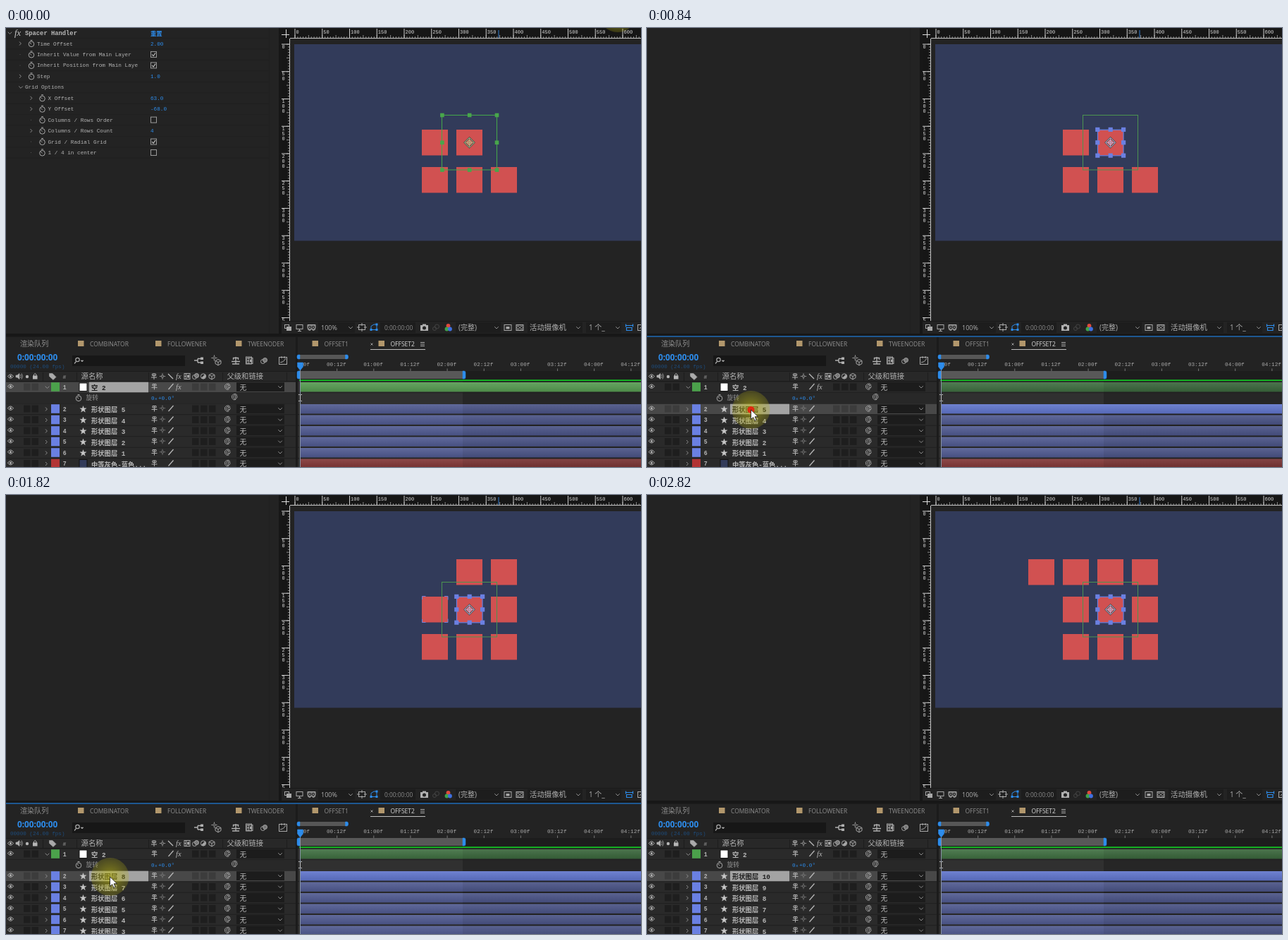
Recreate the animation shown at these times as an HTML page. Size 901 by 622 pixels, loop 2890 ms.

```html
<!DOCTYPE html>
<html lang="zh">
<head>
<meta charset="utf-8">
<style>
html, body { margin: 0; width: 100%; height: 100%; overflow: hidden; background: #232323; }
svg { display: block; width: 901px; height: 622px; }
text { white-space: pre; }
.mono { font-family: 'Liberation Mono', 'Noto Sans CJK SC', 'Noto Sans CJK', monospace; }
.ui { font-family: 'Open Sans', 'Noto Sans CJK SC', 'Noto Sans CJK', sans-serif; }
.serif { font-family: 'Liberation Serif', serif; font-style: italic; }
.b { font-weight: bold; }
</style>
</head>
<body>
<svg viewBox="0 0 901 622" xmlns="http://www.w3.org/2000/svg">
  <defs>
    <radialGradient id="halo">
      <stop offset="0" stop-color="#c2bd14" stop-opacity=".62"/>
      <stop offset="1" stop-color="#b4ae14" stop-opacity=".24"/>
    </radialGradient>
    <linearGradient id="shade" x2="0" y2="1">
      <stop offset="0" stop-color="#fff" stop-opacity=".1"/>
      <stop offset="1" stop-color="#000" stop-opacity=".1"/>
    </linearGradient>
  </defs>
  <g id="base"></g>
  <g id="scene"></g>
  <g id="pointer">
    <circle r="27" fill="url(#halo)"/>
    <circle id="click" stroke-width="2.4" stroke-opacity=".8"/>
    <path d="M0 0V13.5L3.2 10.6L5.4 15.4L7.7 14.4L5.6 9.8H10Z" fill="#fff" stroke="#111" stroke-width=".8"/>
  </g>
</svg>
<script>
const LOOP = 2890, BLUE = '#2d8ceb', GREY = '#a8a8a8', DARK = '#1d1d1d';
const $ = id => document.getElementById(id);
const range = (n, f) => Array.from({ length: n }, (_, i) => f(i)).join('');

const rect = (x, y, w, h, fill, more = '') =>
  `<rect x="${x}" y="${y}" width="${w}" height="${h}" fill="${fill}" ${more}/>`;
const frame = (x, y, w, h, color, width = 1) =>
  rect(x, y, w, h, 'none', `stroke="${color}" stroke-width="${width}"`);
const line = (d, color = GREY, width = 1, fill = 'none') =>
  `<path d="${d}" fill="${fill}" stroke="${color}" stroke-width="${width}"/>`;
const dot = (x, y, r, fill, more = '') => `<circle cx="${x}" cy="${y}" r="${r}" fill="${fill}" ${more}/>`;
const ring = (x, y, r, color = GREY, width = 1) => dot(x, y, r, 'none', `stroke="${color}" stroke-width="${width}"`);
const text = (x, y, s, size, fill = GREY, cls = 'mono') =>
  `<text x="${x}" y="${y}" font-size="${size}" fill="${fill}" class="${cls}">${s}</text>`;

const right = (x, y) => line(`M${x - 1} ${y - 2.5}l2.4 2.5l-2.4 2.5`, '#8c8c8c');
const down = (x, y) => line(`M${x - 2.8} ${y - 1.3}l2.8 2.8l2.8 -2.8`, '#8c8c8c');
const watch = (x, y) => ring(x, y + .8, 3.8) + line(`M${x - 1.5} ${y - 4.5}h3M${x - 2} ${y - 1}L${x} ${y + 1}`);
const check = (x, y, on) => frame(x - 4, y - 4, 8, 8, '#9a9a9a') +
  (on ? line(`M${x - 2.4} ${y}l2 2.2l3 -4.4`, '#bbb', 1.2) : '');
const spiral = (x, y) => line(`M${x + .5} ${y + 1.5}a1.6 1.6 0 1 1 1 -1.8a2.8 2.8 0 1 1 -2 -2.3M${x + 1.7} ${y - 2}a4.2 4.2 0 1 0 -2 6`, GREY, .9);
const eye = y => line(`M2.5 ${y}q4 -5.5 8 0q-4 5.5 -8 0z`, '#b5b5b5') + dot(6.5, y, 1.5, '#b5b5b5');
const sun = (x, y, c = '#7d7d7d') => ring(x, y, 1.6, c) +
  line(`M${x} ${y - 4}v1.5M${x} ${y + 2.5}v1.5M${x - 4} ${y}h1.5M${x + 2.5} ${y}h1.5`, c);
const shy = (x, y) => line(`M${x - 4} ${y + 1.5}h8M${x} ${y - 4}v8.5M${x - 2.5} ${y - 1}v-2.5h5v2.5z`, '#b0b0b0');
const slash = (x, y) => line(`M${x - 3.5} ${y + 4}l7 -8`, '#bbb', 1.2);
const cube = (x, y) => line(`M${x} ${y - 4}l4 2v4l-4 2.5l-4 -2.5v-4zM${x - 4} ${y - 2}l4 2l4 -2M${x} ${y}v4.5`);
const film = (x, y) => frame(x - 4, y - 4, 8, 8, GREY) + line(`M${x - 1.5} ${y - 4}v8M${x - 4} ${y}h2.5`) + rect(x, y - 2, 3, 4, GREY);
const discs = (x, y) => ring(x - 1.5, y + 1, 3) + dot(x + 1.5, y - 1, 3, '#777', `stroke="${GREY}"`);

function rulers() {
  const step = 38.75, minor = step / 10;
  return rect(391, 0, 510, 15, '#161616') + rect(391, 0, 12, 415, '#161616') +
    line('M403 14.5H901M402.5 15V415', '#c4c4c4') +
    line('M391 9.5h11M397.5 2v12', '#ddd') +
    range(127, i => line(`M${410 + i * minor} ${i % 5 ? 12 : 10}V14`, '#aaa', .8)) +
    range(101, i => line(`M${i % 5 ? 400 : 398} ${23 + i * minor}H402`, '#aaa', .8)) +
    range(13, i => line(`M${410 + i * step} 1V14`, '#ccc') + text(411.5 + i * step, 7.6, i * 50, 7, '#d8d8d8')) +
    range(11, i => line(`M391 ${23 + i * step}H402`, '#ccc') + [...String(i * 50)].map((c, j) =>
      text(391.5, 28.5 + i * step + j * 7, c, 7, '#d8d8d8')).join('')) +
    line('M699 3V14', '#2f6fb8', 1.2);
}

function viewerBar() {
  const y = 424.5;
  return rect(391, 415, 510, 18, '#232323') +
    [[443, 52], [638, 64], [740, 78], [823, 50], [531, 50]].map(([x, w]) => rect(x, 417, w, 15, DARK)).join('') +
    frame(395.5, 420.5, 6, 5, GREY) + rect(398, 423, 7, 6, GREY) +
    frame(412, 420.5, 9, 6, GREY) + line('M414 429.5h5M416.5 427v2', GREY, 1.2) +
    line('M428 420.5h11v4q0 4 -3.5 4l-2 -2.5l-2 2.5q-3.5 0 -3.5 -4z', GREY, 1, '#777') + ring(431, 424, 1.7, '#222') + ring(436, 424, 1.7, '#222') +
    text(447, 428, '100%', 9, '#b0b0b0', 'ui') + down(489, y) +
    frame(500.5, 420.5, 9, 7, GREY) + line('M505 418v4M505 426v4M498 424h4M508 424h4') +
    line('M518 427.5v-5l4 -2.5h4v7.5z', BLUE) + rect(516.5, 426, 3, 3, BLUE) + rect(524.5, 426, 3, 3, BLUE) + rect(524.5, 418.5, 3, 3, BLUE) +
    text(537, 427.6, '0:00:00:00', 8.4, '#8c8c8c', 'ui') +
    rect(588, 421, 11, 8, '#b0b0b0') + rect(591, 419.5, 5, 2, '#b0b0b0') + dot(593.5, 425, 2.5, '#232323') +
    ring(608, 426, 2.5, '#444') + ring(611.5, 423, 3, '#444') +
    dot(627.5, 422, 2.9, '#e04a3c') + dot(625.5, 426.5, 2.9, '#3fa34a') + dot(630, 426.5, 2.9, '#3f6fe0') +
    text(642, 428, '(完整)', 10, '#b0b0b0', 'ui') + down(696, y) +
    frame(707, 420.5, 10, 8, GREY) + rect(709.5, 423, 5, 3.5, GREY) +
    frame(724, 420.5, 10, 8, GREY) + line('M724 420.5l10 8M734 420.5l-10 8M729 420.5l5 4l-5 4l-5 -4z', GREY, .8) +
    text(743, 428.3, '活动摄像机', 10.4, '#b0b0b0', 'ui') + down(812, y) +
    text(827, 428.3, '1 个_', 10, '#b0b0b0', 'ui') + down(868, y) +
    line('M879.5 421.5h10M880.5 424.5h7.5v4h-7.5zM879.5 419.5v4M889.5 419.5v4', BLUE, 1.2) +
    frame(896.5, 420.5, 8, 8, GREY) + line('M899 426l3 -3');
}

function tabs() {
  const tab = (x, s, on) => rect(x, 443, 8.5, 8, '#b2976c') + text(x + 17, 450.7, s, 8.5, on ? '#d8d8d8' : '#8f8f8f', 'ui');
  return text(20, 451, '渲染队列', 10.1, '#8f8f8f', 'ui') +
    tab(102, 'COMBINATOR') + tab(212, 'FOLLOWENER') + tab(326, 'TWEENODER') +
    tab(434.5, 'OFFSET1') + tab(528.5, 'OFFSET2', true) +
    line('M517.5 446.5l3 3m0 -3l-3 3', '#999') +
    line('M588 445.5h6M588 448h6M588 450.5h6', '#aaa') + line('M517 455.5H595', '#bdbdbd');
}

function timelineTop() {
  const y = 493.5;
  return text(16, 471, '0:00:00:00', 11.8, BLUE, 'ui b') + text(6, 481.6, '00000 (24.00 fps)', 7.6, '#1d4c7c') +
    rect(94, 464, 160, 15, '#171717') + ring(101.5, 470, 2.7, '#aaa', 1.2) + line('M99.5 472.5l-2.5 3', '#aaa', 1.2) + line('M106 471h4l-2 2z', '#aaa', .5, '#aaa') +
    line('M267 471h5M272 468.5h7M272 474h7M272 468.5v5.5', '#b0b0b0', 1.4) + rect(276, 466.5, 4, 3.5, '#b0b0b0') + rect(276, 472.5, 4, 3.5, '#b0b0b0') +
    cube(301, 473.5) + sun(295.5, 467.5, GREY) +
    line('M320 472.5h12M326 466v10M322.5 470v-2.5h7v2.5M321 476h10', '#b0b0b0', 1.3) +
    film(346, 471.5) + frame(340.5, 466, 8, 10, GREY) + discs(366, 471.5) +
    frame(387.5, 466.5, 11, 10, GREY) + line('M389 474q5 0 8 -6M391 465v3M395 465v3') +
    rect(0, 487, 411, 13, '#282828') + line('M0 486.5H411M0 500.5H411', '#1b1b1b') +
    line('M52.5 488v12M100.5 488v12M202.5 488v12M307.5 488v12M398.5 488v12', DARK) +
    eye(y) + line('M14 492h2l3 -2.5v8l-3 -2.5h-2z', '#b0b0b0', .6, '#b0b0b0') + line('M20.5 491q2 2.5 0 5M22 489.5q3 4 0 8', '#b0b0b0', .8) +
    dot(30, 494, 2.2, '#b5b5b5') + rect(38, 492.5, 6.5, 5, '#b5b5b5') + line('M39.5 493v-2q1.8 -3 3.5 0v2', '#b5b5b5') +
    line('M61.5 489.5h4.5l5 5l-4 4l-5.5 -5z', '#aaa', .6, '#aaa') + text(80.5, 496.5, '#', 8) +
    text(106.5, 497, '源名称', 10.4, '#b0b0b0', 'ui') +
    shy(210, y) + sun(222, y, GREY) + line('M230 490l7 7', '#bbb', 1.2) + text(241, 497, 'fx', 10.5, '#bbb', 'serif') +
    film(257, y) + discs(269, y) + ring(280, y, 3.6) + line('M277.5 496l5 -5a3.6 3.6 0 0 1 -5 5z', GREY, 1, GREY) + cube(292, y) +
    text(313.5, 497, '父级和链接', 10.3, '#b0b0b0', 'ui');
}

function timeRuler() {
  const handle = (x, y, h, side) => line(`M${x} ${y}h${side * 2}q${side * 2} 0 ${side * 2} 2v${h - 4}q0 2 ${-side * 2} 2h${-side * 2}z`, BLUE, .5, BLUE);
  const label = k => `0${k >> 1}:${k % 2 ? '12' : '00'}f`;
  return rect(411, 438, 3, 184, '#1b1b1b') +
    rect(416, 463, 66, 6, '#575757') + handle(417, 463, 6, -1) + handle(481.5, 463, 6, 1) +
    text(417, 479, '00f', 7.7) +
    range(9, k => text(455 + k * 52.15, 479, label(k + 1), 7.7)) +
    range(10, k => line(`M${417.5 + k * 52.15} 482.5V486`, '#777')) +
    rect(414, 486, 487, 12, DARK) + rect(417, 486, 231, 11, '#585858') +
    handle(417, 486, 11, -1) + handle(648, 486, 11, 1) +
    rect(414, 501, 234, 121, '#303030') + rect(648, 501, 253, 121, '#262626') +
    rect(416, 498.3, 485, 1.8, '#12c322');
}

function base() {
  return rect(0, 0, 901, 622, '#232323') + rect(387, 0, 4, 434, '#171717') + line('M373.5 0V433', '#202020') +
    rect(409, 23, 492, 278.5, '#323b5a') + rulers() + viewerBar() + line('M391 415.5H901', '#191919') +
    rect(0, 433, 901, 4.5, '#171717') + tabs() + timelineTop() + timeRuler();
}

function effectPanel() {
  // [depth, kind, label, value]; kind: k keyed, c checkbox, g group
  const rows = [
    [0, 'k', 'Time Offset', '2.00'], [0, 'c', 'Inherit Value from Main Layer', 1],
    [0, 'c', 'Inherit Position from Main Laye', 1], [0, 'k', 'Step', '1.0'], [0, 'g', 'Grid Options'],
    [1, 'k', 'X Offset', '63.0'], [1, 'k', 'Y Offset', '-68.0'], [1, 'c', 'Columns / Rows Order', 0],
    [1, 'k', 'Columns / Rows Count', '4'], [1, 'c', 'Grid / Radial Grid', 1], [1, 'c', '1 / 4 in center', 0]];
  return range(12, i => line(`M0 ${14.5 + i * 15.45}H373`, '#1f1f1f', .7)) +
    down(5.5, 7) + text(12, 10.5, 'fx', 12.5, '#ccc', 'serif') + text(27, 10, 'Spacer Handler', 8.8, '#b8b8b8', 'mono b') +
    text(205, 10.6, '重置', 8.4, BLUE, 'mono b') +
    rows.map(([depth, kind, label, value], i) => {
      const y = 22 + i * 15.45, x = 20 + depth * 15.5;
      if (kind === 'g') return down(21, y) + text(27, y + 2.5, label, 7.7, '#b2b2b2');
      return (kind === 'k' ? right(x, y) + text(205, y + 2.7, value, 7.7, BLUE)
        : dot(x, y, .5, '#666') + check(209.5, y, value)) +
        watch(x + 16, y) + text(x + 24, y + 2.5, label, 7.7, '#b2b2b2');
    }).join('');
}

function layerRow(row, name, look, selected) {
  const isNull = look === 'null', solid = look === 'solid', shape = look === 'shape';
  const y = 509 + (isNull ? 0 : row * 15.5), top = y - 7.3;
  const tint = isNull ? '#4ba14b' : solid ? '#b23434' : '#6a80e2';
  const bar = isNull ? (selected ? '#559a50' : '#3e6e40') : solid ? '#803535' : selected ? '#5f74cb' : '#4f5990';
  const star = `M109.5 ${y - 4.5}l1.2 3.2h3.4l-2.7 2.1l1 3.4l-2.9 -2l-2.9 2l1 -3.4l-2.7 -2.1h3.4z`;
  const slot = x => rect(x, y - 5.5, 9.5, 10, selected ? '#3c3c3c' : '#1e1e1e');
  return rect(0, top, 411, 14.8, selected ? '#484848' : '#2a2a2a') + line(`M0 ${top + 15}H411`, DARK, .8) +
    eye(y - 1.3) + [25, 36.5, 264, 276, 288].map(slot).join('') +
    (isNull ? down(58.5, y) : right(57, y)) + rect(64, y - 6.8, 12, 12.6, tint) +
    text(80.8, y + 2.9, row, 8.2, '#b4b4b4', 'mono b') +
    (shape ? line(star, '#c8c8c8', .3, '#c8c8c8')
      : rect(104, y - 6, 11, 11.5, isNull ? '#fff' : '#323b5a', 'stroke="#111"')) +
    (selected ? rect(118, top, 84, 14.6, '#a3a3a3') : '') +
    text(121, y + 4, name, 9.3, selected ? '#1c1c1c' : '#b8b8b8', 'mono b') +
    shy(210.5, y - 1) + (shape ? sun(222, y - 1.3) : '') + slash(234, y - 1) +
    (isNull ? text(241, y + 2.5, 'fx', 10.5, '#bbb', 'serif') : '') +
    spiral(316.5, y - 1) + rect(327, y - 6.8, 68, 12.8, '#1c1c1c') + text(331.5, y + 3.5, '无', 9.8, '#b8b8b8', 'ui') + down(389, y - .5) +
    line(`M414 ${top + 15}H901`, DARK, .8) + rect(417, top + .3, 484, 13.4, bar) + rect(417, top + .3, 484, 13.4, 'url(#shade)') +
    (selected ? '' : rect(648, top + .3, 253, 13.4, '#000', 'opacity=".07"'));
}

function layers(count, nullOn) {
  const y = 524;
  return layerRow(1, '空 2', 'null', nullOn) +
    rect(0, 517, 411, 15, '#282828') + watch(103, y) + text(113.5, y + 3.2, '旋转', 8.8, '#8f8f8f') +
    text(206, y + 3, '0', 7.7, BLUE) + text(211, y + 3, 'x', 6, BLUE) + text(216, y + 3, '+0.0°', 7.7, BLUE) + spiral(326.5, y - 1.5) +
    range(6, i => {
      const id = count - i;
      return layerRow(i + 2, id > 0 ? '形状图层 ' + id : '中等灰色-蓝色...', id > 0 ? 'shape' : 'solid', !nullOn && i === 0);
    }) +
    line('M417.5 484V622', '#8793a6') + line('M413.5 474h8v6l-4 5l-4 -5z', BLUE, .5, BLUE) +
    line('M415 519.5h1.5l1 1l1 -1h1.5M417.5 520v8M415 528.5h1.5l1 -1l1 1h1.5', '#c0c0c0');
}

// Spiral placement of the copies around the first square
const CELLS = [[0, 0], [-1, 0], [-1, 1], [0, 1], [1, 1], [1, 0], [1, -1], [0, -1], [-1, -1], [-2, -1]];

const handles = (x, y, half, size, color) => [-1, 0, 1].map(i => [-1, 0, 1].map(j =>
  i || j ? rect(x + i * half - size / 2, y + j * half - size / 2, size, size, color) : '').join('')).join('');

function stage(count, nullOn, flash) {
  const x = 657.5, y = 162.3, mark = nullOn ? '#a9c98f' : '#b9bde6';
  return CELLS.slice(0, count).map(([i, j]) => rect(639 + i * 49, 144 + j * 53, 37, 36.5, '#d15151')).join('') +
    (flash ? line('M590.5 148v-4.5h5M622 143.5h5v5M590.5 176v4.5h5M622 180.5h5v-5', '#7080d8') : '') +
    frame(618.5, 123.5, 78, 77.5, nullOn ? '#44a84a' : '#4c9450') +
    (nullOn ? handles(x + .2, 162.3, 38.8, 5.6, '#48a64b')
      : frame(x - 18, y - 18, 36.5, 36.5, '#6b80e2', 1.2) + handles(x + .2, y, 18.4, 6.2, '#6b80e2')) +
    line(`M${x} ${y - 7}l7 7l-7 7l-7 -7z`, '#444', 2) + line(`M${x} ${y - 7}l7 7l-7 7l-7 -7z`, mark) +
    ring(x, y, 2.8, mark) + line(`M${x} ${y - 6}v12M${x - 6} ${y}h12`, mark, .8);
}

// Held pointer positions: [time, x, y]
const PATH = [[0, 868, -21], [70, 765, 85], [140, 605, 235], [210, 430, 375], [280, 272, 470], [350, 192, 514],
  [420, 180, 519], [490, 167, 525], [560, 156, 531], [630, 147.5, 541], [2030, 165, 522], [2090, 215, 470],
  [2160, 297.5, 385], [2230, 436, 276], [2300, 620, 140], [2370, 775, 25], [2440, 868, -60]];
const COPIES = [1260, 1540, 1750, 1890, 2030];
const PRESS = 770, RELEASE = 980, RING_END = 1400;

let shown = '';
function draw(t) {
  const count = 5 + COPIES.filter(c => t >= c).length;
  const nullOn = t < PRESS, focus = !nullOn && t < 2750, flash = t >= 1820 && t < 1890;
  const key = [count, nullOn, focus, flash].join();
  if (key !== shown) {
    shown = key;
    $('scene').innerHTML = (nullOn ? effectPanel() : '') + stage(count, nullOn, flash) + layers(count, nullOn) +
      (focus ? line('M0 437H901', '#1f6dba', 1.3) : '');
  }
  const [, x, y] = PATH.filter(p => t >= p[0]).pop();
  $('pointer').setAttribute('transform', `translate(${x} ${y})`);

  const click = $('click'), q = Math.floor(t / 70) * 70;
  const pressed = t >= PRESS && t < RELEASE, ringing = t >= RELEASE && t < RING_END;
  click.setAttribute('r', pressed ? 5 : ringing ? 8 + 16 * (q - RELEASE) / 350 : 0);
  click.setAttribute('fill', pressed ? '#e02a10' : 'none');
  click.setAttribute('stroke', ringing ? '#cf4a18' : 'none');
}

$('base').innerHTML = base();
const start = performance.now();
function tick() {
  draw((performance.now() - start) % LOOP);
  requestAnimationFrame(tick);
}
tick();
</script>
</body>
</html>
```
